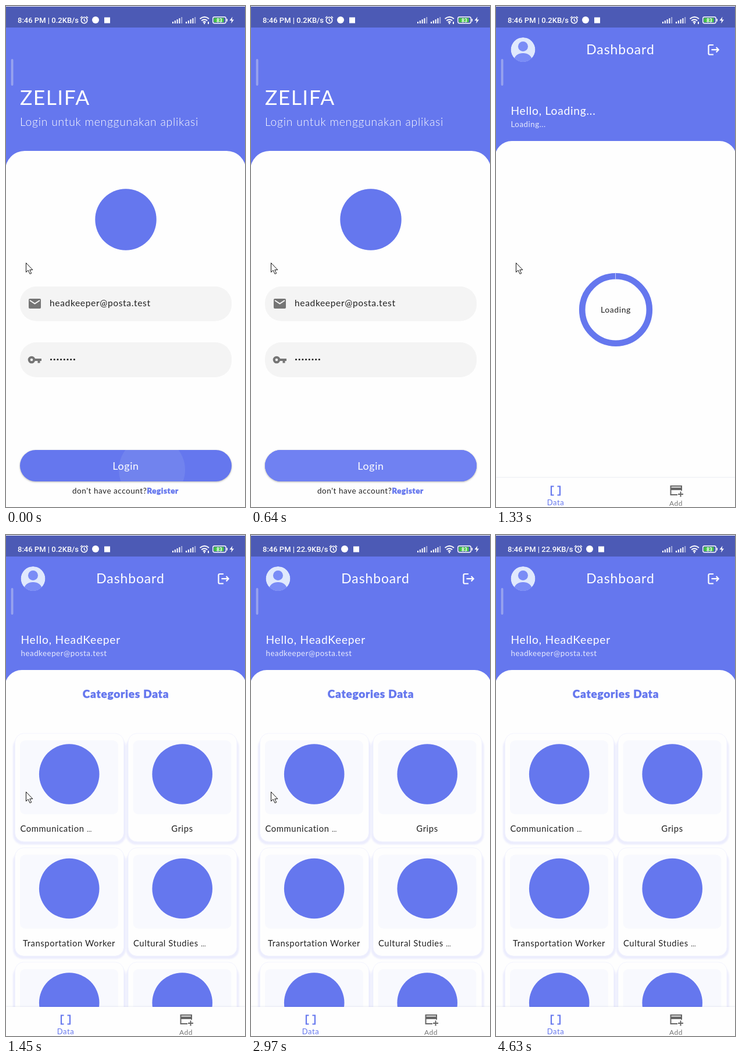
These frames come from a looping animation (411x861 px, 5060 ms). An HTML page:

```html
<!DOCTYPE html>
<html lang="id">
<head>
<meta charset="utf-8">
<title>Login</title>
<style>
html, body { margin: 0; width: 100%; height: 100%; overflow: hidden; background: #fefefe; }
svg { display: block; width: 411px; height: 861px; }
text { font-family: Lato, "Open Sans", sans-serif; letter-spacing: .04em; }
.status text { font: 500 13px Roboto, sans-serif; letter-spacing: 0; }
.mid { text-anchor: middle; }
.blue { fill: #6577ee; }
.white { fill: #fff; }
.sheet { fill: #fefefe; }
.heavy { font-weight: 900; stroke: #6577ee; stroke-width: .4px; }
.light { font-weight: 300; }
.dots { letter-spacing: 0; font-size: 11px; }
.line { fill: none; stroke: #fff; }
.glow { fill: #ecedfd; filter: blur(1px); }
.nav { filter: drop-shadow(0 -1px 1px rgba(60, 70, 140, .1)); }
</style>
</head>
<body>
<svg viewBox="0 0 411 861">
  <defs>
    <clipPath id="pill"><rect x="24" y="763" width="364" height="54" rx="27"/></clipPath>
    <clipPath id="face"><circle cx="46.5" cy="75" r="21"/></clipPath>
    <g id="bars" fill="#fff">
      <rect y="27" width="2" height="3"/><rect x="3.8" y="25" width="2" height="5"/>
      <rect x="7.6" y="23" width="2" height="7"/><rect x="11.4" y="21" width="2" height="9"/>
      <rect x="15.2" y="19" width="2" height="11" opacity=".5"/>
    </g>
  </defs>

  <g id="login">
    <rect class="blue" y="1" width="411" height="300"/>
    <rect class="sheet" x="-1" y="249" width="413.500" height="660" rx="33"/>
    <text class="white" x="24" y="170" font-size="35.500">ZELIFA</text>
    <text class="white light" x="24" y="206" font-size="19.300">Login untuk menggunakan aplikasi</text>
    <circle class="blue" cx="206" cy="367" r="52.700"/>

    <g fill="#f4f4f4">
      <rect x="24" y="482" width="364" height="59.500" rx="28"/>
      <rect x="24" y="578" width="364" height="60" rx="28"/>
    </g>
    <rect x="39" y="503" width="21" height="17" rx="2" fill="#757575"/>
    <path d="M41 506l8.500 5.500 8.500-5.500" fill="none" stroke="#f4f4f4" stroke-width="2"/>
    <text x="75" y="516" font-size="15.600" fill="#222">headkeeper@posta.test</text>
    <g fill="none" stroke="#757575" stroke-width="4">
      <circle cx="44" cy="608" r="4.300"/>
      <path d="M49 608h12M56.500 608v5.500"/>
    </g>
    <path d="M77.500 607.500h41" stroke="#222" stroke-width="3.200" stroke-linecap="round" stroke-dasharray="0 5.700"/>

    <g id="button">
      <rect id="base" x="24" y="763" width="364" height="54" rx="27"/>
      <g clip-path="url(#pill)"><circle id="splash"/></g>
    </g>
    <text class="white mid" x="206" y="797" font-size="17.800">Login</text>
    <text x="114" y="837.500" font-size="13.500" fill="#222">don't have account?<tspan class="heavy blue">Register</tspan></text>
  </g>

  <g id="dash">
    <rect class="blue" y="1" width="411" height="270"/>
    <rect class="sheet" x="-2" y="232" width="415.500" height="670" rx="29"/>
    <g clip-path="url(#face)">
      <circle cx="46.500" cy="75" r="21" fill="#e0e9fd"/>
      <circle cx="46.500" cy="69.500" r="8.500" fill="#7a8cf6"/>
      <ellipse cx="46.500" cy="92" rx="15" ry="11" fill="#7a8cf6"/>
    </g>
    <text class="white mid" x="214" y="83" font-size="22.900">Dashboard</text>
    <path class="line" stroke-width="2.200" d="M374 67h-6.500q-2 0-2 2v12.500q0 2 2 2h6.500M370.500 75.200h12M378.700 71l4 4.200-4 4.200"/>
    <text class="white" id="hello" x="25.500" y="186.500" font-size="19.200"></text>
    <text class="white" id="mail" x="25.500" y="208" font-size="13.300" opacity=".85"></text>

    <g id="loading">
      <circle cx="206" cy="522" r="57.800" fill="none" stroke="#6577ee" stroke-width="10.600"/>
      <path d="M205.500 458.500v11" stroke="#c8cff8"/>
      <text class="mid" x="206" y="527" font-size="14" fill="#222">Loading</text>
    </g>
    <g id="data">
      <text class="heavy mid blue" x="206" y="280" font-size="19">Categories Data</text>
      <g id="cards"></g>
    </g>

    <rect class="sheet nav" y="811" width="411" height="50"/>
    <path d="M99.500 825.500h-4.500v15h4.500M105.500 825.500h4.500v15h-4.500" fill="none" stroke="#6577ee" stroke-width="2.200"/>
    <text class="mid blue" x="102.500" y="858" font-size="13">Data</text>
    <path d="M312 840h-11.500v-15h18.500v8M300 831h19M317.500 834.500v9M313 839h9" fill="none" stroke="#666" stroke-width="2"/>
    <rect x="300" y="827.500" width="19" height="4" fill="#666"/>
    <text class="mid" x="309.500" y="859" font-size="12" fill="#757575">Add</text>
  </g>

  <rect x="8.700" y="91" width="3.800" height="46" rx="1.900" fill="#98a3ee"/>

  <g class="status">
    <rect y="1" width="411" height="36" fill="#4c5ab5"/>
    <text class="white" id="speed" x="20" y="29"></text>
    <g id="icons">
      <circle class="line" cx="134.500" cy="24.500" r="5.200" stroke-width="1.600"/>
      <path class="line" stroke-width="1.500" d="M134.500 21.500v3.500l2 1.500M128 20.500l3-2.800M141 20.500l-3-2.800"/>
      <circle class="white" cx="154" cy="24" r="6"/>
      <rect class="white" x="169" y="19.500" width="10" height="10"/>
    </g>
    <use href="#bars" x="286"/><use href="#bars" x="309"/>
    <path class="line" stroke-width="2" d="M333.500 22q8-6.500 15.500 0M336.200 25.200q5-4 10 0M338.800 28q2.400-1.800 4.800 0"/>
    <circle class="white" cx="341.200" cy="30" r="1.200"/>
    <path class="white" id="tick" d="M347 27h2v4h-2z"/>
    <rect class="line" x="355.700" y="18.700" width="22.600" height="11" rx="3" stroke-width="1.400"/>
    <rect x="357.500" y="20.500" width="17" height="7.500" rx="1" fill="#43c443"/>
    <path class="white" d="M379.500 22h1.500v4.500h-1.500zM389.500 18.500l-5 6.500h3.500l-1 5 5-6.500h-3.500z"/>
    <text class="white mid" x="367" y="27.500" style="font-size:8.500px;font-weight:700">83</text>
  </g>

  <path id="cursor" d="M.5.500v16l3.600-3.400 3 6.400 2.600-1.200-2.900-5.900h5z" fill="#fff" stroke="#111"/>
</svg>

<script>
const LOOP = 5060;
// The picture holds still between these times (ms).
const STEPS = [0, 150, 270, 400, 520, 640, 910, 1050, 1450, 2020, 2970,
  3570, 3710, 3830, 3950, 4100, 4250, 4390, 4510, 4630];

// time, splash centre x, radius, button colour, splash colour
const RIPPLE = [
  [0, 251, 57, '#6577ee', '#7183ee'],
  [150, 240, 102, '#6375e8', '#737fe3'],
  [270, 227, 143, '#6172e2', '#7581d9'],
  [400, 214, 184, '#5f70dc', '#7782d0'],
  [520, 206, 220, '#6577ee', '#7482e1'],
  [640, 206, 220, '#6577ee', '#7081f2'],
];
// time, cursor tip x, y
const PATH = [
  [0, 34, 441], [3570, 34, 442], [3710, 62, 466], [3830, 115, 590], [3950, 187, 710],
  [4100, 291, 795], [4250, 341, 842], [4390, 352, 851], [4510, 358, 857], [4630, 420, 870],
];
const LABELS = ['Communication …', 'Grips', 'Transportation Worker', 'Cultural Studies …', '', ''];

const $ = id => document.getElementById(id);
const set = (id, attrs) => {
  for (const key in attrs) $(id).setAttribute(key, attrs[key]);
};
const show = (id, on) => set(id, { visibility: on ? 'visible' : 'hidden' });
const latest = (rows, t) => rows.filter(row => row[0] <= t).pop();

$('cards').innerHTML = LABELS.map((label, i) => {
  const x = 15.5 + i % 2 * 194.5, y = 341 + (i >> 1) * 196.5;
  const align = label.endsWith('…') ? `x="${x + 9}"` : `class="mid" x="${x + 93}"`;
  const text = label.replace('…', '<tspan class="dots">…</tspan>');
  return `<rect class="glow" x="${x - 3.5}" y="${y + 6}" width="194" height="185" rx="17"/>
    <rect x="${x}" y="${y}" width="187" height="186" rx="15" fill="#fefefe" stroke="#f3f4fe"/>
    <rect x="${x + 8.5}" y="${y + 12}" width="169" height="127" rx="9" fill="#f8f9fe"/>
    <circle class="blue" cx="${x + 93.2}" cy="${y + 70}" r="51.800"/>
    <text ${align} y="${y + 169}" font-size="14.800" fill="#222">${text}</text>`;
}).join('');

function draw(t) {
  const [, cx, r, fill, splash] = latest(RIPPLE, t);
  set('base', { fill });
  set('splash', { cx, cy: 797, r, fill: splash });
  const lift = t >= 150 && t < 640 ? 3 : 1.5;
  $('button').style.filter = `drop-shadow(0 ${lift}px ${lift}px rgba(0, 0, 0, .3))`;

  const entering = t < 1050;
  const loaded = t >= 1450;
  set('dash', {
    opacity: t < 910 ? 0 : entering ? .5 : 1,
    transform: `translate(0 ${entering ? 30 : 0})`,
  });
  set('data', { display: loaded ? 'inline' : 'none' });
  set('loading', { display: loaded ? 'none' : 'inline' });
  $('hello').textContent = loaded ? 'Hello, HeadKeeper' : 'Hello, Loading...';
  $('mail').textContent = loaded ? 'headkeeper@posta.test' : 'Loading...';

  const fast = t >= 2020;
  $('speed').textContent = `8:46 PM | ${fast ? '22.9' : '0.2'}KB/s`;
  set('icons', { transform: `translate(${fast ? 7 : 0} 0)` });
  show('tick', t < 2970);

  const [, x, y] = latest(PATH, t);
  set('cursor', { transform: `translate(${x} ${y})` });
}

let last = -1;
function tick() {
  const now = performance.now() % LOOP;
  const t = STEPS.filter(step => step <= now).pop();
  if (t !== last) draw(last = t);
  requestAnimationFrame(tick);
}
tick();
</script>
</body>
</html>
```
